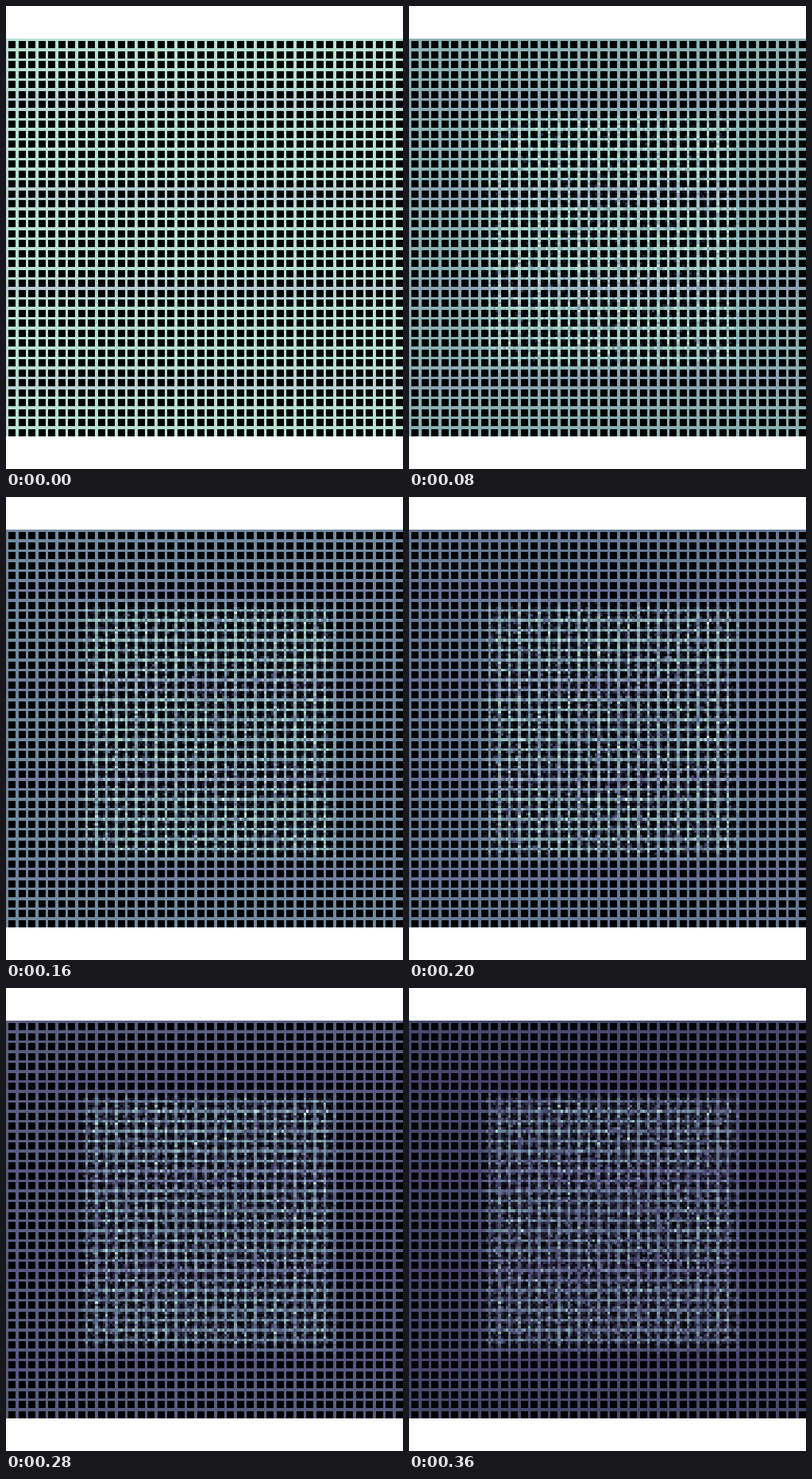
Recreate the animation shown at these times as an HTML page with a canvas. Size 500 px wide and 582 px high, loop 0.4 s.

```html
<!DOCTYPE html>
<html>
<head>
<meta charset="utf-8">
<style>
  html, body { margin: 0; width: 100%; height: 100%; overflow: hidden; background: #fff; }
  canvas { position: absolute; left: 0; top: 41px; }
</style>
</head>
<body>
<canvas id="grid" width="500" height="500"></canvas>
<script>
const SIZE = 160, PIXELS = 500, STEPS = 10, STEP_MS = 40;
const ctx = document.getElementById('grid').getContext('2d');

// Energy level, then red, green, blue.
const ramp = [
  [0, 0, 0, 0], [.35, 72, 72, 108], [.44, 88, 92, 128], [.56, 102, 121, 148],
  [.7, 124, 154, 168], [.79, 138, 175, 178], [.89, 160, 205, 198],
  [1, 184, 224, 208], [1.4, 250, 255, 248]
];

let seed = 7;
function random() {
  seed = (seed + 0x6D2B79F5) | 0;
  let t = Math.imul(seed ^ (seed >>> 15), 1 | seed);
  t = (t + Math.imul(t ^ (t >>> 7), 61 | t)) ^ t;
  return ((t ^ (t >>> 14)) >>> 0) / 4294967296;
}

const clamp = v => Math.max(0, Math.min(1, v));
const nudge = () => Math.floor(random() * 3) - 1;
const cellAt = pixel => Math.floor((pixel + .5) * SIZE / PIXELS);

function colour(level) {
  const v = Math.min(level, 1.4);
  const i = Math.max(1, ramp.findIndex(stop => stop[0] >= v));
  const a = ramp[i - 1], b = ramp[i];
  const k = (v - a[0]) / (b[0] - a[0]);
  return [1, 2, 3].map(c => a[c] + (b[c] - a[c]) * k);
}

// How strongly a cell belongs to the soft-edged central square.
function looseness(x, y) {
  return clamp((54 - Math.max(Math.abs(x - 81), Math.abs(y - 80.5))) / 7);
}

// Every loose cell leaks some energy to a random neighbour, then all cells fade.
function advance(cells, step) {
  const next = cells.slice();
  const rate = Math.min(.25, .06 + .04 * step);
  for (let y = 0; y < SIZE; y++) {
    for (let x = 0; x < SIZE; x++) {
      const loose = looseness(x, y);
      if (!loose) continue;
      const i = y * SIZE + x;
      const leak = cells[i] * loose * rate * random() ** 2;
      next[i] -= leak;
      next[i + nudge() + nudge() * SIZE] += leak;
    }
  }
  if (step === 0) return next;
  return next.map((v, i) =>
    v * (.89 + .07 * looseness(i % SIZE, Math.floor(i / SIZE))));
}

function render(cells) {
  const colours = Array.from(cells, (v, i) => {
    const y = Math.floor(i / SIZE);
    const violet = Math.max(0, Math.cos((y - 24.5) / 6)) ** 3;
    const [r, g, b] = colour(v);
    return [r, g * (1 - .08 * violet), b, 255];
  });
  const image = ctx.createImageData(PIXELS, PIXELS);
  for (let y = 0; y < PIXELS; y++) {
    for (let x = 0; x < PIXELS; x++) {
      image.data.set(colours[cellAt(y) * SIZE + cellAt(x)], (y * PIXELS + x) * 4);
    }
  }
  return image;
}

let cells = Float32Array.from({ length: SIZE * SIZE }, (_, i) =>
  (i % SIZE) % 4 && Math.floor(i / SIZE) % 4 ? 0 : 1);
const frames = [];
for (let step = 0; step < STEPS; step++) {
  cells = advance(cells, step);
  frames.push(render(cells));
}

const start = performance.now();
function draw() {
  const step = Math.floor((performance.now() - start) / STEP_MS) % STEPS;
  ctx.putImageData(frames[step], 0, 0);
  requestAnimationFrame(draw);
}
draw();
</script>
</body>
</html>
```
